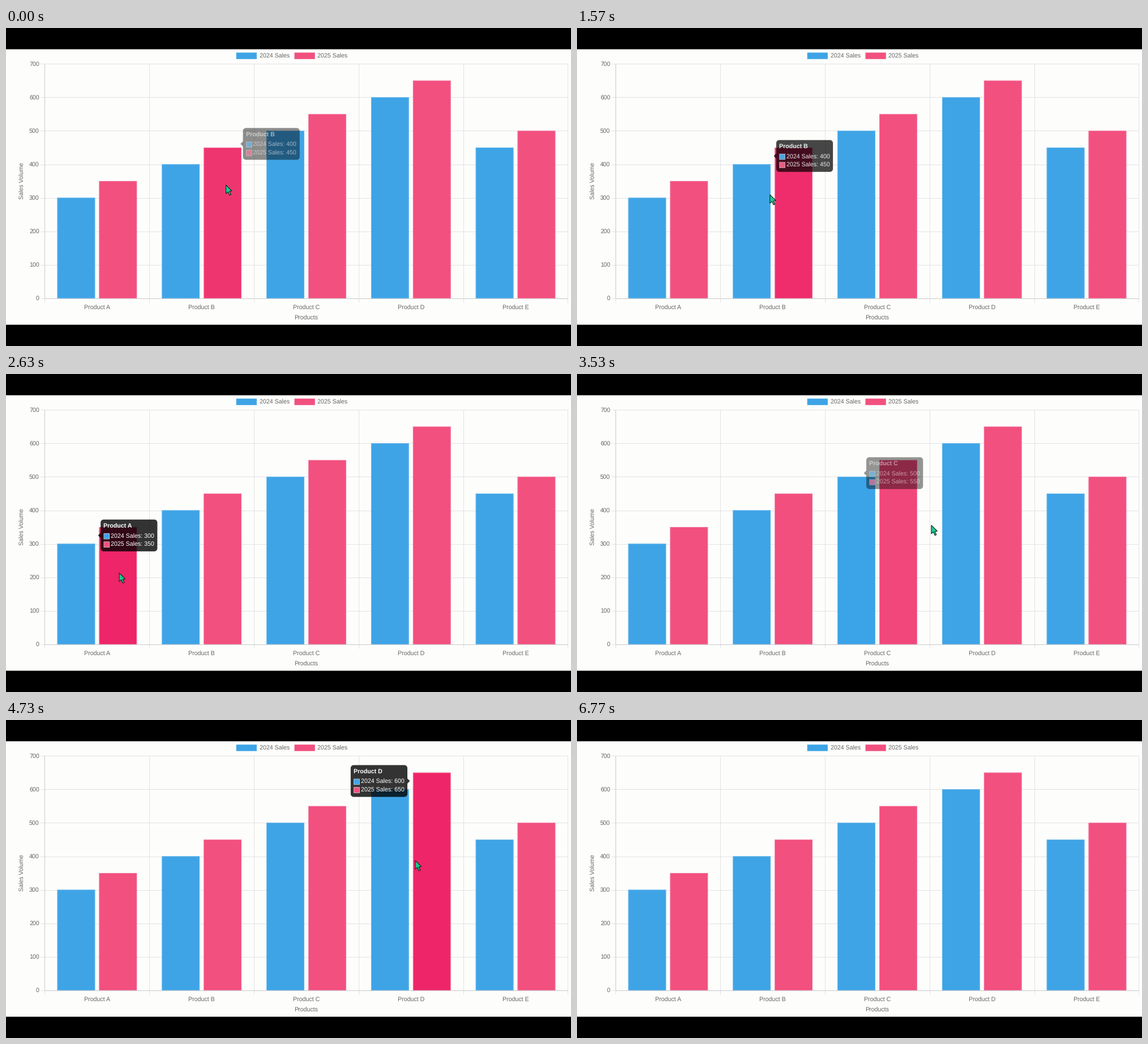
These frames come from a looping animation (998 px wide and 561 px high, 6.8 s). A matplotlib script:

```python
import numpy as np
import matplotlib.pyplot as plt
from matplotlib.animation import FuncAnimation
from matplotlib.colors import to_rgb
from matplotlib.patches import Polygon, Rectangle

plt.rcParams["font.family"] = "Liberation Sans"
plt.rcParams["text.hinting"] = "none"

W, H, DPI = 998, 561, 100
PX = 72 / DPI                      # points per pixel
LOOP, STEP, TICK = 6800, 25, 5     # ms: loop, picture, hover logic
FONT = 10.67
LEFT, RIGHT, TOP, BASE = 68.5, 992.4, 63.3, 476.8
SLOT = (RIGHT - LEFT) / 5
BAR_W = SLOT * 0.36

NAMES = [f"Product {c}" for c in "ABCDE"]
SERIES = ["2024 Sales", "2025 Sales"]
VALUES = [(300, 350), (400, 450), (500, 550), (600, 650), (450, 500)]
FILL = [np.array(to_rgb(c)) for c in ("#3ea4e6", "#f2507f")]
HOVER = [np.array(to_rgb(c)) for c in ("#1f9cf6", "#ee2568")]
EDGE = ["#62b4ea", "#f4709a"]

TIP_W, TIP_H, PAD, CARET = 100.2, 56.1, 5.33, 4.45
HIDE = 5830                        # pointer leaves the chart

# pointer path: time, x, y
PATH = np.array([
    (-90, 415.5, 279), (0, 388.5, 277), (150, 385, 276),
    (400, 383.5, 275), (1430, 383.5, 275), (1530, 349, 290),
    (1710, 275, 326), (1795, 231, 348), (1825, 219, 350.5), (1950, 204, 351),
    (2150, 200, 351), (3050, 200, 351), (3200, 262, 338), (3300, 385, 314),
    (3357, 460, 300), (3455, 600, 273), (3578, 645.5, 262), (3708, 719.5, 249),
    (3725, 725, 248), (4000, 723, 248), (LOOP, 723, 248)])


def y_of(value):
    return BASE - value * (BASE - TOP) / 700


def center(i):
    return LEFT + SLOT * (i + 0.5)


def bar_left(i, s):
    return LEFT + SLOT * (i + 0.1 + 0.4 * s + 0.02)


def pointer(t):
    return [np.interp(t, PATH[:, 0], PATH[:, k]) for k in (1, 2)]


def bar_under(x, y):
    for i, pair in enumerate(VALUES):
        for s, v in enumerate(pair):
            if 0 <= x - bar_left(i, s) <= BAR_W and y_of(v) <= y <= BASE:
                return i, s
    return None


def tip_home(i):
    """Top-left corner of the resting tooltip of a category."""
    gap = CARET + 1.78
    x = center(i) + gap if i <= 2 else center(i) - gap - TIP_W
    return x, y_of(sum(VALUES[i]) / 2) - TIP_H / 2


def out_quart(p):
    return 1 - (1 - p) ** 4


class Tween:
    def __init__(self, value, span, ease):
        self.a = self.b = value
        self.t0, self.span, self.ease = -1e4, span, ease

    def at(self, t):
        p = min(max((t - self.t0) / self.span, 0), 1)
        return self.a + (self.b - self.a) * self.ease(p)

    def to(self, goal, t):
        if goal != self.b:
            self.a, self.b, self.t0 = self.at(t), goal, t


def simulate():
    """Run the hover logic once and keep one state per picture."""
    x0, y0 = tip_home(2)
    tx, ty = Tween(x0, 400, out_quart), Tween(y0, 400, out_quart)
    fade = Tween(0.2, 200, lambda p: p)
    heat = [[Tween(0, 400, out_quart) for _ in SERIES] for _ in NAMES]
    active, states = 2, []
    for t in range(-90, LOOP, TICK):
        hit = bar_under(*pointer(t)) if t < HIDE else None
        if hit:
            active = hit[0]
            gx, gy = tip_home(active)
            tx.to(gx, t)
            ty.to(gy, t)
        fade.to(1 if hit else 0, t)
        for i, row in enumerate(heat):
            for s, tween in enumerate(row):
                tween.to(int(hit == (i, s)), t)
        if t >= 0 and t % STEP == 0:
            states.append((t, active, tx.at(t), ty.at(t), fade.at(t),
                           [[w.at(t) for w in row] for row in heat]))
    return states


fig = plt.figure(figsize=(W / DPI, H / DPI), dpi=DPI, facecolor="black")
ax = fig.add_axes([0, 0, 1, 1])
ax.set(xlim=(0, W), ylim=(H, 0))
ax.axis("off")


def rect(x, y, w, h, color, z=1):
    return ax.add_patch(Rectangle((x, y), w, h, fc=color, lw=0, zorder=z,
                                  snap=False))


def line(xs, ys, color, z=2, **kw):
    ax.plot(xs, ys, color=color, lw=PX, zorder=z, solid_capstyle="butt", **kw)


def label(x, y, text="", ha="center", color="#666666", z=4, **kw):
    return ax.text(x, y + 3.8, text, ha=ha, va="baseline", color=color,
                   fontsize=FONT * PX, zorder=z, **kw)


rect(0, 37.5, W, 486, "#fdfdfc", 0)

# grid and axes
GRID, AXIS = "#e3e3e6", "#c9c9cc"
for k in range(6):
    x = LEFT + k * SLOT
    line([x, x], [TOP, BASE + 7], GRID)
for v in range(0, 701, 100):
    line([LEFT - 7, RIGHT], [y_of(v)] * 2, GRID)
    label(58.7, y_of(v) - 0.3, str(v), "right")
line([LEFT, LEFT], [TOP, BASE], AXIS, 3)
line([LEFT, RIGHT], [BASE, BASE], AXIS, 3.5)
for i, name in enumerate(NAMES):
    label(center(i), 492.7, name)
label(center(2), 511.2, "Products")
ax.text(31.8, 270, "Sales Volume", rotation=90, rotation_mode="anchor",
        ha="center", va="baseline", color="#666666", fontsize=FONT * PX)

# legend
for s, name in enumerate(SERIES):
    x = 406.7 + 102.8 * s
    rect(x, 43.4, 36.2, 11.4, FILL[s])
    label(x + 41, 49.2, name, "left")

# bars
bars = []
for i, pair in enumerate(VALUES):
    row = []
    for s, v in enumerate(pair):
        x, y = bar_left(i, s), y_of(v)
        row.append(rect(x, y, BAR_W, BASE - y, FILL[s], 3))
        line([x + 0.4, x + 0.4, x + BAR_W - 0.4, x + BAR_W - 0.4],
             [BASE, y + 0.4, y + 0.4, BASE], EDGE[s], 3.2, snap=False)
    bars.append(row)

# tooltip
bubble = ax.add_patch(Polygon([(0, 0)], fc="black", lw=0, zorder=6))
title = label(0, 0, "", "left", "white", 8, weight="bold")
rows = []
for s in range(2):
    rows.append((rect(0, 0, 10.67, 10.67, "white", 7),
                 rect(0, 0, 8.9, 8.9, FILL[s], 7.5),
                 label(0, 0, "", "left", "white", 8)))

ARROW = np.array([(0, 0), (0, 15.2), (3.6, 12), (6.3, 18), (8.9, 16.9),
                  (6.2, 11), (10.6, 10.6)])
cursor = ax.add_patch(Polygon(ARROW, fc="#1fc993", ec="#10241f", lw=1.1 * PX,
                              joinstyle="miter", zorder=10))


def bubble_shape(x, y, right):
    r, mid = 5.33, y + TIP_H / 2
    turn = np.linspace(0, np.pi / 2, 7)

    def corner(cx, cy, start):
        return [(cx + r * np.cos(start + a), cy + r * np.sin(start + a))
                for a in turn]

    def caret(edge, out, down):
        return [(edge, mid - CARET * down), (edge + CARET * out, mid),
                (edge, mid + CARET * down)]

    x2, y2 = x + TIP_W, y + TIP_H
    return (corner(x + r, y + r, np.pi) + corner(x2 - r, y + r, 1.5 * np.pi)
            + (caret(x2, 1, 1) if right else [])
            + corner(x2 - r, y2 - r, 0) + corner(x + r, y2 - r, np.pi / 2)
            + ([] if right else caret(x, -1, -1)))


STATES = simulate()


def draw(n):
    t, active, x, y, alpha, heat = STATES[n]
    for i, row in enumerate(bars):
        for s, bar in enumerate(row):
            bar.set_facecolor(FILL[s] + (HOVER[s] - FILL[s]) * heat[i][s])

    bubble.set_xy(bubble_shape(x, y, active > 2))
    bubble.set_alpha(0.8 * alpha)
    title.set_text(NAMES[active])
    title.set_position((x + PAD, y + 11.3 + 3.8))
    title.set_alpha(alpha)
    for s, (frame, chip, text) in enumerate(rows):
        mid = y + 29 + 14.6 * s
        frame.set_xy((x + PAD, mid - 4.9))
        chip.set_xy((x + PAD + 0.9, mid - 4))
        text.set_text(f"{SERIES[s]}: {VALUES[active][s]}")
        text.set_position((x + PAD + 12.4, mid + 3.8))
        frame.set_alpha(0.75 * alpha)
        chip.set_alpha(alpha)
        text.set_alpha(alpha)

    cursor.set_xy(ARROW + pointer(t))
    cursor.set_visible(t < HIDE)
    return []


anim = FuncAnimation(fig, draw, frames=LOOP // STEP, interval=STEP,
                     init_func=lambda: [], repeat=True, repeat_delay=0)
plt.show()
```
